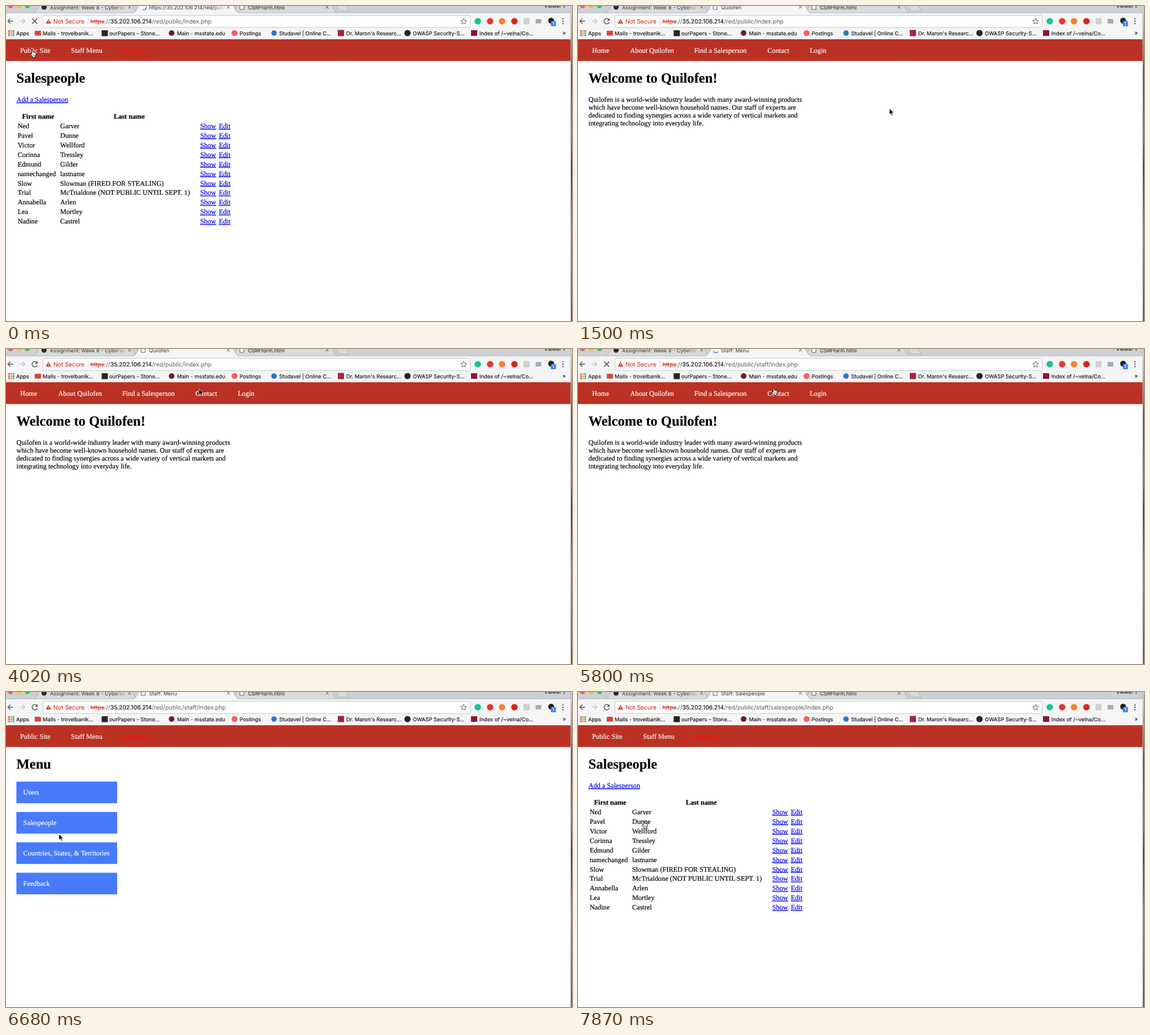
Animation of 1003x559 px, one loop 8000 ms. Source, as an HTML page:

```html
<!DOCTYPE html>
<html lang="en">
<head>
<meta charset="utf-8">
<title>Browser session</title>
<style>
html, body { margin: 0; width: 100%; height: 100%; overflow: hidden; background: #fff; }
svg { display: block; }
text, tspan { fill: currentColor; stroke: currentColor; stroke-width: .18px; }
text { white-space: pre; text-rendering: geometricPrecision; }
.ui { font-family: Inter, "Open Sans", sans-serif; font-size: 9.35px; color: #1c1c1c; }
.tab { font-size: 9.05px; color: #3c3c3c; }
.fade { stroke: none; }
.url { font-size: 10.4px; color: #767676; }
.red { color: #d23f31; }
.page { font-family: "Liberation Serif", "Times New Roman", serif; font-size: 12.32px; color: #000; }
.h1 { font-size: 24.64px; font-weight: bold; }
.th { font-weight: bold; text-anchor: middle; }
.link { color: #0000ee; text-decoration: underline; text-decoration-thickness: 1px; }
.nav { color: #fff; }
.out { color: #ff0d0d; }
</style>
</head>
<body>
<svg id="stage" width="1003" height="559" viewBox="0 0 1003 559"></svg>
<script>
const LOOP = 8000;
const COMPANY = 'Quilofen';
const HOST = '35.202.106.214';

// Pointer steps: time, x, y
const POINTER = [
  [0, 43, 77], [140, 45, 78], [290, 70, 82], [440, 120, 86], [600, 172, 86],
  [750, 220, 83], [900, 254, 80], [1050, 292, 96],
  [1200, 370, 125], [1350, 480, 165], [1500, 552, 182], [1650, 573, 176],
  [1790, 535, 158], [1940, 420, 130], [2090, 270, 108], [2240, 150, 97],
  [2380, 90, 98], [2530, 74, 98], [2680, 200, 80], [2830, 364, 71],
  [3120, 320, 76], [3270, 262, 82], [3420, 239, 82], [3570, 246, 80],
  [4020, 342, 71], [4170, 400, 80], [4320, 426, 85], [4470, 402, 80],
  [4610, 366, 74], [4760, 345, 71], [5200, 343, 68],
  [5350, 343, 68], [5500, 343, 68], [5650, 343, 68], [5800, 343, 68],
  [5950, 330, 70], [6090, 262, 74], [6240, 200, 76],
  [6380, 150, 150], [6530, 110, 226], [6680, 94, 252], [6830, 105, 238],
  [6980, 113, 228], [7270, 113, 228], [7420, 113, 228], [7570, 113, 228], [7720, 113, 228]
];
const HAND_SPANS = [[0, 1050], [5200, 5950], [6980, LOOP]];

// Browser changes; each entry adds to the ones before it
const STATES = [
  [0, { page: 'sales', title: 'https://' + HOST + '/red/public', path: 'index.php', busy: true }],
  [900, { title: COMPANY }],
  [1050, { page: 'home' }],
  [1200, { busy: false }],
  [5200, { title: HOST + '/red/public/staff', path: 'staff/index.php', busy: true }],
  [5650, { title: 'Staff: Menu' }],
  [5950, { page: 'menu' }],
  [6090, { busy: false }],
  [7270, { title: HOST + '/red/public/staff', path: 'staff/salespeople/index.php', busy: true }],
  [7570, { title: 'Staff: Salespeople' }],
  [7720, { page: 'sales', busy: false }]
];

const PEOPLE = [
  ['Ned', 'Garver'], ['Pavel', 'Dunne'], ['Victor', 'Wellford'], ['Corinna', 'Tressley'],
  ['Edmund', 'Gilder'], ['namechanged', 'lastname'], ['Slow', 'Slowman (FIRED FOR STEALING)'],
  ['Trial', 'McTrialdone (NOT PUBLIC UNTIL SEPT. 1)'], ['Annabella', 'Arlen'],
  ['Lea', 'Mortley'], ['Nadine', 'Castrel']
];

const esc = s => s.replace(/&/g, '&amp;');
const text = (x, y, s, cls = '', extra = '') =>
  `<text x="${x}" y="${y}" class="${cls}" ${extra}>${esc(s)}</text>`;
const rect = (x, y, w, h, fill, extra = '') =>
  `<rect x="${x}" y="${y}" width="${w}" height="${h}" fill="${fill}" ${extra}/>`;
const dot = (x, y, r, fill) => `<circle cx="${x}" cy="${y}" r="${r}" fill="${fill}"/>`;
const line = (d, stroke, w = 1) =>
  `<path d="${d}" fill="none" stroke="${stroke}" stroke-width="${w}"/>`;
const group = (id, body, cls = '') => `<g id="${id}" class="${cls}">${body}</g>`;

const sheet = x => `<path d="M${x - 3.5} -3h4l3 3v6h-7z" fill="#fff" stroke="#5e5e5e"/>`;
const cross = x => line(`M${x - 2.7} -.6l5.4 5.4m0 -5.4l-5.4 5.4`, '#666');
const tabShape = (x1, x2, fill) =>
  `<path d="M${x1 - 6} 12Q${x1 - 1} 11 ${x1 + 1} 6L${x1 + 5} -3H${x2 - 5}L${x2 - 1} 6Q${x2 + 1} 11 ${x2 + 6} 12" fill="${fill}" stroke="#a6a6a6" stroke-width=".8"/>`;

function tabs() {
  return rect(0, 0, 1003, 13, '#cdd1d5') +
    dot(8, -.8, 4.7, '#fc5b57') + dot(23, -.8, 4.7, '#fdbc40') + dot(38, -.8, 4.7, '#34c84a') +
    tabShape(54, 228, '#d9dadb') + tabShape(406, 582, '#d9dadb') +
    line('M0 12.3H1001', '#a9a9a9', .8) + tabShape(231, 407, '#f5f5f5') +
    `<path d="M584 -2H602L608 9H592Q590 9 589 7z" fill="#d9dadb" stroke="#a6a6a6" stroke-width=".8"/>` +
    dot(67.5, 2, 4.6, '#2b2b2b') +
    text(78, 5.6, 'Assignment: Week 8 - Cyberse', 'tab fade', 'style="fill:url(#fadeA)"') +
    cross(219) + cross(394) + cross(569) + sheet(418) +
    text(429, 5.6, 'CSRFform.html', 'tab') +
    text(953.5, 3.4, 'Viewer 1');
}

function toolbar() {
  const icons = [[836, '#15c39a'], [858, '#e8352e'], [879, '#f58233'], [901, '#d8271c']];
  return rect(0, 12.7, 1001, 46.3, '#f5f5f5') + rect(227, 11.8, 184, 2, '#f5f5f5') +
    line('M12.5 27H3.6M7.8 22.6L3.4 27l4.4 4.4', '#555', 1.4) +
    line('M24.5 27H33.4M29.2 22.6L33.6 27l-4.4 4.4', '#c4c4c4', 1.4) +
    rect(65.5, 16.5, 757, 21.5, '#fff', 'rx="2.5" stroke="#c6c6c6"') +
    `<path d="M75.3 22.4L80.2 31.2H70.4z" fill="#d23f31"/>` +
    rect(74.8, 25.2, 1, 3, '#fff') + rect(74.8, 29, 1, 1, '#fff') +
    text(84, 31, 'Not Secure', 'url red') +
    rect(145, 21, 1, 12, '#d0d0d0') +
    `<text x="149.5" y="31" class="url"><tspan class="red" text-decoration="line-through">https</tspan>://<tspan style="color:#1a1a1a">${HOST}</tspan>/red/public/<tspan id="path"></tspan></text>` +
    line('M811 21.8l1.5 3.6 3.9.3-3 2.5.9 3.8-3.3-2-3.3 2 .9-3.8-3-2.5 3.9-.3z', '#666') +
    icons.map(([x, c]) => dot(x, 27, 5.8, c)).join('') +
    rect(917, 21.5, 11, 11, '#cfcfcf', 'rx="1"') + rect(938.5, 23, 10, 8, '#a3acb8') +
    dot(966, 26, 5.2, '#222') + rect(965.5, 26.5, 9, 9.5, '#3f83e6', 'rx="1.5"') +
    text(968, 34.3, '1', 'nav', 'font-size="8"') +
    [22.8, 27, 31.2].map(y => dot(987, y, 1.2, '#555')).join('');
}

function bookmarks() {
  const items = [
    [65, 'Mails - trovelbanik...'], [183, 'ourPapers – Stone...'], [303, 'Main - msstate.edu'],
    [414, 'Postings'], [484, 'Studavel | Online C...'], [603, "Dr. Maron's Researc..."],
    [721, 'OWASP Security-S...'], [839, 'Index of /~velna/Co...']
  ];
  const hues = ['#e0574b', '#e9a23b', '#4a9a55', '#4a86e0'];
  let out = '';
  for (let i = 0; i < 9; i++) {
    const col = i % 3, row = Math.floor(i / 3);
    out += rect(4 + col * 3.8, 43 + row * 3.8, 2.8, 2.8, hues[(i + row) % 4]);
  }
  return out + text(18, 51.6, 'Apps') + items.map(([x, s]) => text(x, 51.6, s)).join('') +
    rect(51, 44, 11, 8.5, '#d9453a') + rect(169.5, 43, 11, 10.5, '#2a2622') +
    dot(293.5, 48, 5, '#6b1f2b') + dot(405, 48, 5.3, '#fd5c63') + dot(475, 48, 4.8, '#2a73cc') +
    rect(588, 42.5, 11, 11, '#a8243c') + dot(711.5, 48, 5.6, '#262626') +
    rect(824, 43, 11, 10, '#8a1538') + text(986.5, 51, '»');
}

const navItem = ([x, s, cls]) => text(x, 83, s, cls || 'nav');
const staffNav = [[25, 'Public Site'], [115.3, 'Staff Menu'], [208, 'Log out', 'out']].map(navItem).join('');
const heading = s => text(18.5, 136.2, s, 'h1');

function homePage() {
  const nav = [[25, 'Home'], [92.4, 'About ' + COMPANY], [206, 'Find a Salesperson'], [335.8, 'Contact'], [410.8, 'Login']];
  const lines = [
    COMPANY + ' is a world-wide industry leader with many award-winning products',
    'which have become well-known household names. Our staff of experts are',
    'dedicated to finding synergies across a wide variety of vertical markets and',
    'integrating technology into everyday life.'
  ];
  return nav.map(navItem).join('') + heading(`Welcome to ${COMPANY}!`) +
    lines.map((s, i) => text(18.5, 170 + i * 13.9, s)).join('');
}

function menuPage() {
  const items = ['Users', 'Salespeople', 'Countries, States, & Territories', 'Feedback'];
  return staffNav + heading('Menu') + items.map((s, i) =>
    rect(18.4, 159 + i * 53.9, 178.6, 38.4, '#477bfb') + text(30.6, 182 + i * 53.9, s, 'nav')).join('');
}

function salesPage() {
  return staffNav + heading('Salespeople') + text(18.5, 170, 'Add a Salesperson', 'link') +
    text(57, 200, 'First name', 'th') + text(218.5, 200, 'Last name', 'th') +
    PEOPLE.map(([first, last], i) => {
      const y = 217 + i * 16.92;
      return text(20.7, y, first) + text(96, y, last) +
        text(344.2, y, 'Show', 'link') + text(377.2, y, 'Edit', 'link');
    }).join('');
}

const fade = (id, x1, x2) => `<linearGradient id="${id}" gradientUnits="userSpaceOnUse" x1="${x1}" x2="${x2}">
  <stop stop-color="#333"/><stop offset="1" stop-color="#333" stop-opacity=".1"/></linearGradient>`;
const defs = `<defs>${fade('fadeA', 190, 213)}${fade('fadeB', 366, 388)}
  <linearGradient id="desk" x2="0" y2="1"><stop stop-color="#b9cad6"/><stop offset=".2" stop-color="#30516c"/><stop offset=".4" stop-color="#4f7896"/><stop offset=".5" stop-color="#1d3a55"/><stop offset=".7" stop-color="#4c86b0"/><stop offset="1" stop-color="#2c5a85"/></linearGradient>
  <clipPath id="titleClip"><path d="M250 -5H389V13H250z"/></clipPath>
</defs>`;

const stage = document.getElementById('stage');
stage.innerHTML = defs + rect(0, 0, 1003, 559, '#fff') +
  group('chrome', tabs() + toolbar() + bookmarks() +
    `<g clip-path="url(#titleClip)">${text(253.5, 5.6, '', 'tab fade', 'id="title" style="fill:url(#fadeB)"')}</g>` +
    group('idle', sheet(243) + line('M54.6 24A4.7 4.7 0 1 0 55.4 28.6', '#555', 1.5) +
      '<path d="M56 21.6v4.6h-4.6z" fill="#555"/>') +
    group('busy', line('M46.4 22.6l8.8 8.8m0 -8.8l-8.8 8.8', '#555', 1.5) +
      group('spin', line('M5 0A5 5 0 0 1 -1.7 4.7', '#4a7fe0', 1.7))), 'ui') +
  rect(0, 59, 1001, 38.7, '#bb3224') +
  group('home', homePage(), 'page') + group('menu', menuPage(), 'page') + group('sales', salesPage(), 'page') +
  rect(1000.4, 0, .8, 559, '#b5b5b5') + rect(1001.2, 13, 1.8, 546, 'url(#desk)') +
  group('arrow', '<path d="M0 0V10.6L2.4 8.4L4.1 12.2L5.9 11.4L4.2 7.7H7.4z" fill="#000" stroke="#fff" stroke-width=".7"/>') +
  group('hand', '<path d="M2.2 1.4Q3.3 -.1 4.2 1.5L5 5.3Q6 4.3 6.8 5.4Q7.9 4.7 8.5 6Q9.8 5.7 10 7.2L10 10.2L8.9 12.4V14.2H4V12.8L.7 9.4Q-.2 8 1.2 7.6L3.1 8.7z" fill="#fff" stroke="#000" stroke-width=".9" stroke-linejoin="round"/>' +
    line('M5 9v3M6.6 9v3M8.2 9v3', '#000', .5));

const el = {};
for (const id of ['path', 'title', 'idle', 'busy', 'spin', 'home', 'menu', 'sales', 'arrow', 'hand'])
  el[id] = document.getElementById(id);
const show = (id, on) => { el[id].style.display = on ? '' : 'none'; };

function draw(t) {
  const [at, x, y] = POINTER.filter(p => p[0] <= t).pop();
  const state = Object.assign({}, ...STATES.filter(s => s[0] <= t).map(s => s[1]));
  const hand = HAND_SPANS.some(([from, to]) => at >= from && at < to);
  for (const id of ['home', 'menu', 'sales']) show(id, state.page === id);
  show('idle', !state.busy);
  show('busy', state.busy);
  show('hand', hand);
  show('arrow', !hand);
  el.title.textContent = state.title;
  el.path.textContent = state.path;
  el.spin.setAttribute('transform', `translate(244 1.5) rotate(${(at * .317) % 360})`);
  el[hand ? 'hand' : 'arrow'].setAttribute('transform', `translate(${x} ${y})`);
}

const start = performance.now();
function tick() {
  draw((performance.now() - start) % LOOP);
  requestAnimationFrame(tick);
}
tick();
</script>
</body>
</html>
```
